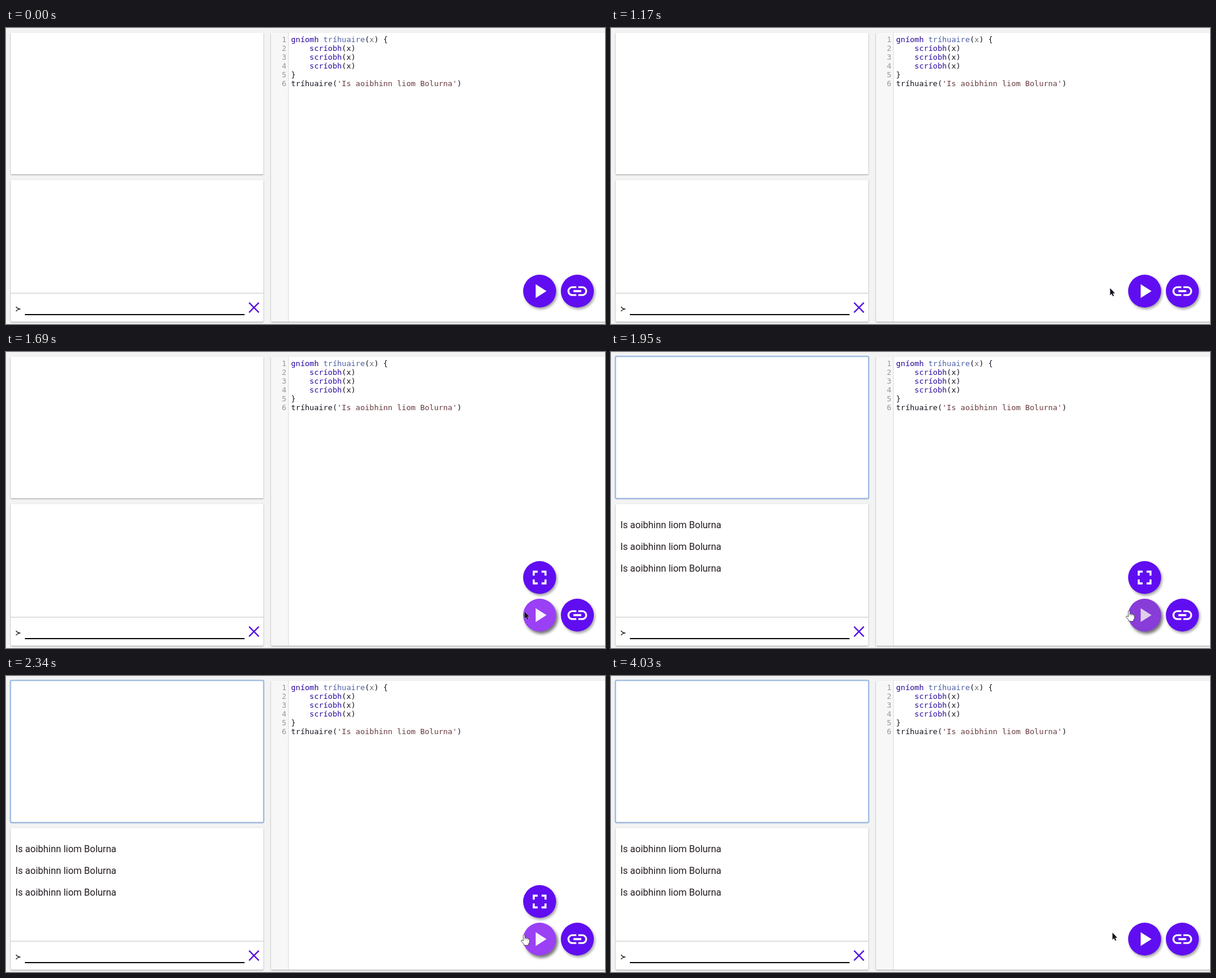
Recreate the animation shown at these times as an HTML page. Size 1017 by 504 pixels, loop 4.16 s.

```html
<!DOCTYPE html>
<html lang="ga">
<head>
<meta charset="utf-8">
<title>Code runner</title>
<style>
  html, body { margin: 0; width: 100%; height: 100%; overflow: hidden; background: #f3f3f3; }
  svg { display: block; width: 100%; height: 100%; }
  text { white-space: pre; }
  .code { font: 13px "DejaVu Sans Mono", monospace; fill: #17131f; }
  .out { font: 16px Roboto, sans-serif; fill: #241c22; }
  .num { fill: #999; text-anchor: end; }
  .key { fill: #24009a; }
  .def { fill: #4c5fa6; }
  .arg { fill: #667080; }
  .call { fill: #2a0a9c; }
  .str { fill: #683a3e; }
  .panel { fill: #fff; filter: drop-shadow(0 1px 1.2px rgba(0,0,0,.36)); }
  .fab { fill: #600ef1; filter: drop-shadow(2px 3px 2px rgba(0,0,0,.36)); }
  .fab.raised { filter: drop-shadow(3px 4px 2.5px rgba(0,0,0,.55)); }
  .icon { fill: #fff; }
</style>
</head>
<body>
<svg viewBox="0 0 1017 504" preserveAspectRatio="none">
  <rect width="1017" height="504" fill="#f3f3f3"/>
  <rect class="panel" x="8" y="8" width="429" height="241" rx="1.5"/>
  <rect id="ring" x="7.5" y="7.5" width="430" height="242" rx="2" fill="none" stroke="#94b5e0" stroke-width="2"/>
  <rect class="panel" x="8" y="259" width="429" height="241" rx="1.5"/>
  <path d="M8 451.5H437" stroke="#c6c6c6"/>
  <path d="M17 474.6Q19 478 24.6 478.5Q19 479 17 482.4" fill="none" stroke="#111" stroke-width="1.2"/>
  <path d="M32 488H405" stroke="#0b0b0b" stroke-width="2"/>
  <path d="M412.7 467.7L429.3 484.3M429.3 467.7L412.7 484.3" stroke="#5a16e2" stroke-width="2.4"/>
  <g id="output" class="out"></g>

  <rect class="panel" x="450" y="8" width="575" height="492" rx="1.5"/>
  <rect x="450" y="8" width="29" height="492" fill="#f7f7f7"/>
  <path d="M479.5 8V500" stroke="#ddd"/>
  <g id="code" class="code"></g>

  <g id="expand">
    <circle class="fab" cx="906" cy="384" r="28"/>
    <path class="icon" transform="translate(886 364) scale(1.6667)" d="M7 14H5v5h5v-2H7v-3zM5 10h2V7h3V5H5v5zM17 17h-3v2h5v-5h-2v3zM14 5v2h3v3h2V5h-5z"/>
  </g>
  <circle id="play" class="fab" cx="906" cy="448" r="28"/>
  <path id="playIcon" class="icon" transform="translate(886 428) scale(1.6667)" d="M8 5v14l11-7z"/>
  <circle class="fab" cx="970" cy="448" r="28"/>
  <path class="icon" transform="translate(950 428) scale(1.6667)" d="M3.9 12c0-1.71 1.39-3.1 3.1-3.1h4V7H7c-2.76 0-5 2.24-5 5s2.24 5 5 5h4v-1.9H7c-1.71 0-3.1-1.39-3.1-3.1zM8 13h8v-2H8zM17 7h-4v1.9h4c1.71 0 3.1 1.39 3.1 3.1s-1.39 3.1-3.1 3.1h-4V17h4c2.76 0 5-2.24 5-5s-2.24-5-5-5z"/>

  <path id="arrow" d="M.4 1V13L3 10.6L5 14.8L6.9 13.9L5 9.7H8.6Z" fill="#12121c" stroke="#fff" stroke-opacity=".75" stroke-width=".9" paint-order="stroke"/>
  <g id="hand" stroke="#444" stroke-width=".9" stroke-linejoin="round">
    <path d="M878.2 451V442Q878.2 440.4 879.6 440.4T881 442V446.5Q882.6 445.2 884 446.6Q885.6 445.8 886.6 447.4Q888.8 447 888.8 449.4V453Q888.4 455 887 456V458.5H879.2V456.6L874.8 451.6Q874.2 449.6 876 449.6Z" fill="#fff"/>
    <path d="M881 446.5V449.5M884 446.8V449.6M886.6 447.6V450" fill="none" stroke-width=".6"/>
  </g>
</svg>
<script>
const STEP = 130, LOOP = 4160;
const ENTER = 1560, HAND = 1820, RUN = 1950, LEAVE = 4030;
const MESSAGE = "Is aoibhinn liom Bolurna";
const el = id => document.getElementById(id);
const span = (cls, text) => `<tspan class="${cls}">${text}</tspan>`;

const body = `    ${span("call", "scríobh")}(x)`;
const lines = [
  `${span("key", "gníomh")} ${span("def", "tríhuaire")}(${span("arg", "x")}) {`,
  body, body, body,
  "}",
  `tríhuaire(${span("str", `'${MESSAGE}'`)})`
];
el("code").innerHTML = lines.map((line, i) => {
  const y = 24 + i * 15;
  return `<text class="num" x="476" y="${y}">${i + 1}</text><text x="484" y="${y}">${line}</text>`;
}).join("");
el("output").innerHTML = [300, 337, 374].map(y => `<text x="16" y="${y}">${MESSAGE}</text>`).join("");

// Pointer stops: time, x, y
const path = [[650, 619, 418], [910, 745, 432], [1170, 847, 442], [1300, 863, 442], [1560, 880, 441], [1820, 880, 441]];

function pointer(t) {
  if (t >= LEAVE) return [851, 436];
  const i = path.findIndex(p => p[0] > t);
  if (i < 0) return path[path.length - 1].slice(1);
  const [a, b] = [path[Math.max(i - 1, 0)], path[i]];
  const k = (t - a[0]) / (b[0] - a[0]);
  return [1, 2].map(n => a[n] + (b[n] - a[n]) * k);
}

const mix = (a, b, k) => `rgb(${a.map((v, i) => Math.round(v + (b[i] - v) * k))})`;
const show = (id, on) => el(id).style.display = on ? "" : "none";

function draw(time) {
  const t = Math.floor((time % LOOP) / STEP) * STEP;
  const hover = t >= ENTER && t < LEAVE;
  const hand = t >= HAND && t < LEAVE;
  const press = t >= RUN ? Math.max(0, Math.min(1, (2340 - t) / 260)) : 0;

  show("ring", t >= RUN);
  show("output", t >= RUN);
  show("expand", hover);
  show("hand", hand);
  show("arrow", t >= 650 && !hand);
  el("arrow").setAttribute("transform", `translate(${pointer(t)})`);
  el("play").classList.toggle("raised", hover);
  el("play").style.fill = hover ? mix([154, 64, 245], [136, 60, 216], press) : "";
  el("playIcon").style.fill = hover ? mix([250, 242, 255], [222, 208, 236], press) : "";
}

const start = performance.now();
function tick() {
  draw(performance.now() - start);
  requestAnimationFrame(tick);
}
tick();
</script>
</body>
</html>
```
